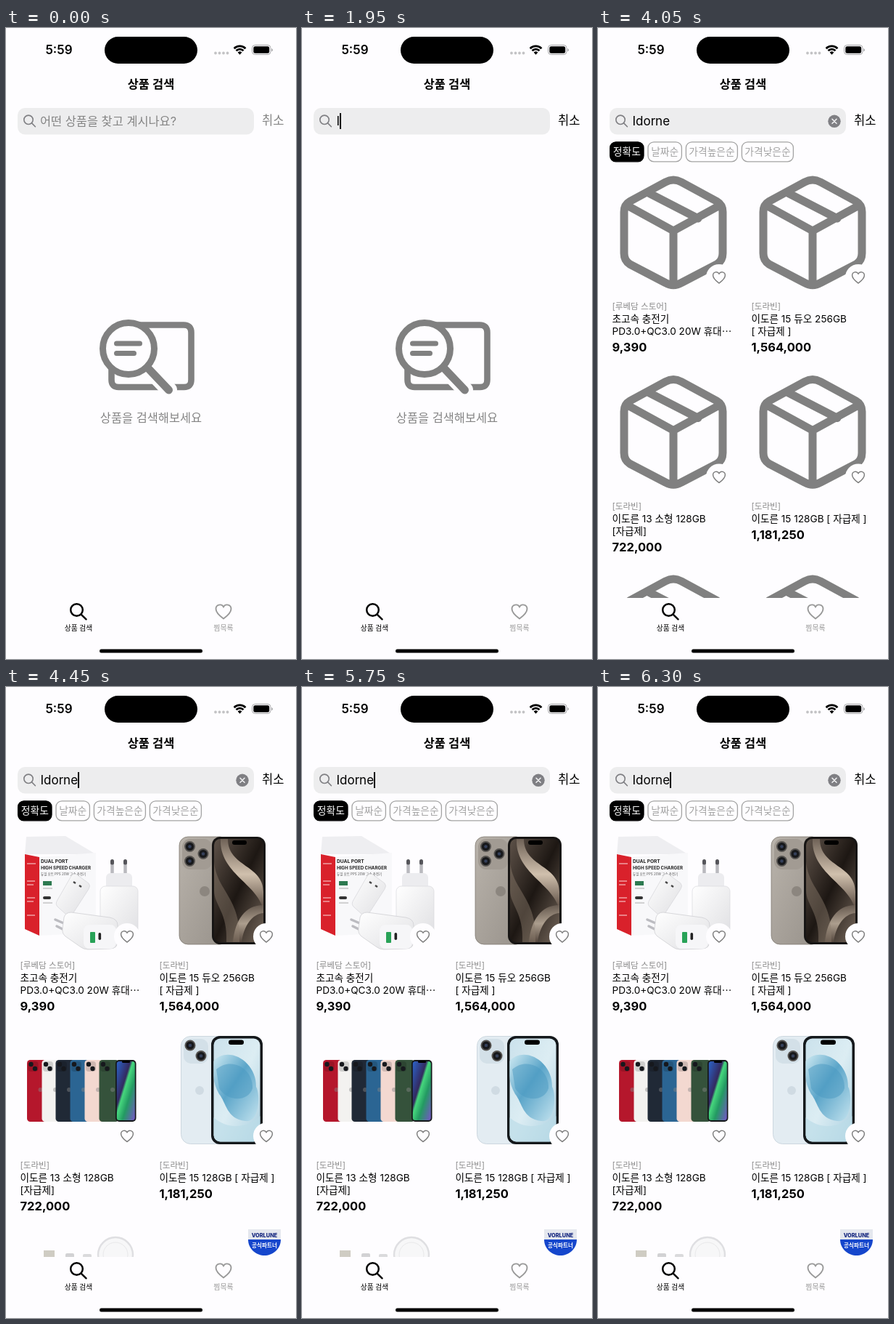
These frames come from a looping animation (400 by 868 pixels, 6500 ms). An HTML page without scripts:

```html
<!DOCTYPE html>
<html lang="ko">
<head>
<meta charset="utf-8">
<title>상품 검색</title>
<style>
html, body { margin: 0; width: 100%; height: 100%; overflow: hidden; background: #fefdff; }
body { position: relative; font-family: Inter, "Noto Sans CJK KR", "Noto Sans CJK", sans-serif; }
svg { position: absolute; left: 0; top: 0; display: block; }
text { font-size: 13.6px; }
.mid { text-anchor: middle; }
.body { font-size: 16.4px; }
.grey { fill: #858585; }
.line { fill: none; stroke-linecap: round; stroke-linejoin: round; }
.chip rect { fill: none; stroke: #a3a3a3; stroke-width: 1.3; }
.chip text { font-size: 13.8px; fill: #a3a3a3; text-anchor: middle; }
.chip .on { fill: #000; stroke: #000; }
.chip .on + text { fill: #fff; }
.shop { font-size: 11.6px; fill: #8c8c8c; }
.price { font-size: 16.5px; font-weight: 700; }
.pack { font-weight: 700; font-size: 6.2px; fill: #222; }

.cancel, .hint, .clear, .empty, .list, .boxes, .photos, .query * { animation: 6.5s step-end infinite; }
.cancel { font-size: 16.6px; animation-name: cancel; animation-timing-function: linear; }
.hint { animation-name: hint; }
.clear { animation-name: clear; animation-timing-function: linear; }
.empty { animation-name: empty; }
.list { animation-name: list; }
.boxes { animation-name: boxes; }
.photos { animation-name: photos; }

.query { position: absolute; left: 47.5px; top: 110px; height: 36px; display: flex; align-items: center; line-height: 36px; }
.query b { font-weight: 400; font-size: 17px; }
.query i { width: 2px; height: 22px; background: #000; animation-name: blink; animation-timing-function: linear; }
.query b:nth-child(1) { animation-name: k1; }
.query b:nth-child(2) { animation-name: k2; }
.query b:nth-child(3) { animation-name: k3; }
.query b:nth-child(4) { animation-name: k4; }
.query b:nth-child(5) { animation-name: k5; }
.query b:nth-child(6) { animation-name: k6; }

@keyframes k1 { 0% { font-size: 0 } 30%, to { font-size: 17px } }
@keyframes k2 { 0% { font-size: 0 } 32.308%, to { font-size: 17px } }
@keyframes k3 { 0% { font-size: 0 } 37.692%, to { font-size: 17px } }
@keyframes k4 { 0% { font-size: 0 } 39.231%, to { font-size: 17px } }
@keyframes k5 { 0% { font-size: 0 } 40.769%, to { font-size: 17px } }
@keyframes k6 { 0% { font-size: 0 } 42.308%, to { font-size: 17px } }
@keyframes blink {
  0%, 13.8% { opacity: 0 } 15.4%, 24.9% { opacity: 1 } 26.92%, 29.99% { opacity: 0 }
  30%, 57.8% { opacity: 1 } 60.8%, 62.9% { opacity: 0 } 65.4%, 72.5% { opacity: 1 }
  75.4%, 78.2% { opacity: 0 } 80.8%, 88.5% { opacity: 1 } 90.8%, 93.8% { opacity: 0 } 96.9%, to { opacity: 1 }
}
@keyframes cancel { 0%, 13.8% { fill: #858585 } 18%, to { fill: #000 } }
@keyframes hint { 0% { opacity: 1 } 30%, to { opacity: 0 } }
@keyframes clear { 0%, 32.2% { opacity: 0 } 35.4%, to { opacity: 1 } }
@keyframes empty { 0% { opacity: 1 } 58.46%, to { opacity: 0 } }
@keyframes list { 0% { opacity: 0 } 58.46%, to { opacity: 1 } }
@keyframes boxes { 0% { opacity: 1 } 63.08%, to { opacity: 0 } }
@keyframes photos { 0% { opacity: 0 } 63.08%, to { opacity: 1 } }
</style>
</head>
<body>
<svg width="400" height="868" viewBox="0 0 400 868">
  <defs>
    <path id="heart" d="M0 10C-4 7-10.5 2.5-10.5-3.5A5.6 5.6 0 0 1 0-6.2A5.6 5.6 0 0 1 10.5-3.5C10.5 2.5 4 7 0 10Z"/>
    <path id="box" class="line" stroke="#808080" stroke-width="11" d="M93 212Q104 206 115 212L164 238.5Q172 243 172 253V310Q172 320 164 325L115 350.5Q104 357 93 350.5L44 325Q36 320 36 310V253Q36 243 44 238.5ZM40 244L104 279L168 244M104 279V352M70 227L138 262"/>
    <g id="like">
      <circle cx="167" cy="343" r="18" fill="#fefdff"/>
      <use href="#heart" transform="translate(167 343) scale(.8)" fill="none" stroke="#7c7c7c" stroke-width="1.8"/>
    </g>
    <g id="lens">
      <circle r="7.5" fill="#55524f"/><circle r="5.6" fill="#17181b"/><circle r="2.3" fill="#35405a"/>
    </g>
    <g id="mini">
      <rect width="27" height="85" rx="4.5"/>
      <rect x="1.5" y="2" width="14" height="14" rx="4" fill="#000" opacity=".15"/>
      <circle cx="5.5" cy="6" r="3.2" fill="#16181d"/><circle cx="11" cy="12" r="3.2" fill="#16181d"/>
      <circle cx="18.5" cy="41" r="3" fill="#888" opacity=".45"/>
    </g>
    <linearGradient id="titan" x2="1" y2="1"><stop stop-color="#b9b3ab"/><stop offset="1" stop-color="#97918a"/></linearGradient>
    <linearGradient id="bronze" x2="1" y2="1"><stop stop-color="#5d5148"/><stop offset=".5" stop-color="#1d1713"/><stop offset="1" stop-color="#74665a"/></linearGradient>
    <linearGradient id="sand" x2="0" y2="1"><stop stop-color="#6f6257"/><stop offset=".5" stop-color="#d0c0ad"/><stop offset="1" stop-color="#57493f"/></linearGradient>
    <linearGradient id="sky" x2="1" y2="1"><stop stop-color="#cbe2ec"/><stop offset=".5" stop-color="#dcedf3"/><stop offset="1" stop-color="#a9cfe0"/></linearGradient>
    <linearGradient id="pool" x2="1" y2="1"><stop stop-color="#cfeaf2"/><stop offset=".45" stop-color="#5ba5c9"/><stop offset="1" stop-color="#c2e2ee"/></linearGradient>
    <linearGradient id="neon" x2="1" y2="1"><stop stop-color="#2c63c8"/><stop offset=".38" stop-color="#33295f"/><stop offset=".45" stop-color="#46d77d"/><stop offset=".65" stop-color="#239a62"/><stop offset="1" stop-color="#7754c8"/></linearGradient>
    <linearGradient id="shell" x2="1" y2="1"><stop stop-color="#fff"/><stop offset="1" stop-color="#dfdfe2"/></linearGradient>
    <clipPath id="s1"><rect x="287" y="209" width="68" height="142" rx="8.5"/></clipPath>
    <clipPath id="s2"><rect x="286.5" y="483.5" width="64" height="142" rx="9"/></clipPath>
  </defs>

  <!-- status bar -->
  <text x="73" y="36" class="mid" style="font-size:17px;font-weight:600">5:59</text>
  <rect x="136" y="12" width="128" height="37" rx="18.5"/>
  <path class="line" stroke="#c3c3c5" stroke-width="3.8" stroke-dasharray="0 5.5" d="M289 34.5H306"/>
  <path class="line" style="stroke-linecap:butt" stroke="#000" stroke-width="2.7" d="M314.6 28.3A11 11 0 0 1 330.4 28.3M317.5 31.3A7 7 0 0 1 327.5 31.3"/>
  <path d="M322.5 36.8L319.6 33.6A4.2 4.2 0 0 1 325.4 33.6Z"/>
  <rect x="339.5" y="23.5" width="25.5" height="13" rx="4" fill="none" stroke="#a5a5a8"/>
  <rect x="341.3" y="25.3" width="21.9" height="9.4" rx="2.5"/>
  <path d="M366.3 28V32.4Q368 31.6 368 30.2Q368 28.7 366.3 28Z" fill="#a5a5a8"/>
  <text x="200" y="83" class="mid body" font-weight="600">상품 검색</text>

  <!-- search field -->
  <rect x="16" y="110" width="326" height="36.5" rx="10" fill="#ededee"/>
  <g class="line" stroke="#7f7f83" stroke-width="1.6"><circle cx="31" cy="126.3" r="6.2"/><path d="M35.6 130.9L40.4 135.7"/></g>
  <text x="47" y="134" class="body grey hint">어떤 상품을 찾고 계시나요?</text>
  <text x="353" y="133" class="cancel">취소</text>
  <g class="clear"><circle cx="326" cy="128.3" r="8.7" fill="#7f7f83"/><path class="line" stroke="#f0f0f1" stroke-width="1.6" d="M323 125.3L329 131.3M329 125.3L323 131.3"/></g>

  <g class="empty">
    <g class="line" stroke="#808080" stroke-width="8.6">
      <path d="M180 408.5H245Q255.5 408.5 255.5 419V484Q255.5 494 245.5 494H155.5Q145.5 494 145.5 484V460"/>
      <path stroke="#fefdff" stroke-width="22" d="M198 470L225 498"/>
      <path stroke-width="11" d="M195 467L224.5 498"/>
      <circle cx="169" cy="441" r="35.5" fill="#fefdff" stroke-width="9"/>
      <path stroke-width="7" d="M152.5 434H184.5M152.5 447.5H176.5"/>
    </g>
    <text x="200" y="542" class="mid body grey">상품을 검색해보세요</text>
  </g>

  <g class="list">
    <g class="chip">
      <rect class="on" x="16.6" y="156.8" width="46.4" height="27" rx="8"/><text x="39.8" y="175">정확도</text>
      <rect x="69" y="156.8" width="46.4" height="27" rx="8"/><text x="92.2" y="175">날짜순</text>
      <rect x="121.4" y="156.8" width="71" height="27" rx="8"/><text x="157" y="175">가격높은순</text>
      <rect x="198.4" y="156.8" width="71" height="27" rx="8"/><text x="234" y="175">가격낮은순</text>
    </g>

    <g class="boxes">
      <use href="#box"/><use href="#box" x="192"/>
      <use href="#box" y="274.5"/><use href="#box" x="192" y="274.5"/>
      <use href="#box" y="549"/><use href="#box" x="192" y="549"/>
    </g>

    <g class="photos">
      <!-- charger -->
      <path d="M28 206L82 205L124 230H26Z" fill="#eeeef1"/>
      <path d="M26 230L46 234V342L26 333Z" fill="#d9212b"/>
      <path d="M46 234L124 228V338L46 342Z" fill="#f8f8fa"/>
      <path d="M29 243H41M29 267H40M29 272H38M29 290H40M29 295H38M29 314H40" stroke="#f0a0a4" stroke-width="1.4"/>
      <text x="48" y="242" class="pack" style="font-size:6.6px">DUAL PORT</text>
      <text x="48" y="250.5" class="pack">HIGH SPEED CHARGER</text>
      <text x="48" y="258.5" style="font-size:4.5px" fill="#555">듀얼 포트 PPS 20W 고속 충전기</text>
      <rect x="51" y="267" width="12" height="6" fill="#2d7a50"/>
      <rect x="51" y="288" width="11" height="4" rx="2" fill="#333"/>
      <path d="M51 277H64M51 297H64" stroke="#aaa"/>
      <path d="M90 260Q94 255 99 259L114 270Q117 273 114 278L92 312Q88 317 83 313L72 303Q67 299 71 293Z" fill="url(#shell)" stroke="#d5d5d9" stroke-width=".7"/>
      <path d="M93 268L96 270M101 273L104 275" stroke="#444" stroke-width="2.4"/>
      <path d="M146.5 257V242M164.5 257V242" class="line" stroke="#b9b9be" stroke-width="4.5"/>
      <path d="M146.5 242V239.5M164.5 242V239.5" class="line" stroke="#55555a" stroke-width="5"/>
      <rect x="138" y="256" width="36" height="30" rx="6" fill="#ececef"/>
      <rect x="130" y="274" width="52" height="72" rx="7" fill="url(#shell)" stroke="#d9d9dd" stroke-width=".7"/>
      <path d="M68 320L82 326M70 329L82 335" class="line" stroke="#bcbcc1" stroke-width="3.5"/>
      <path d="M80 317Q82 310 90 310L143 317Q154 319 154 328V350Q154 360 143 360L113 361Q107 361 102 357L82 343Q77 339 78 332Z" fill="url(#shell)" stroke="#d0d0d4" stroke-width=".8"/>
      <rect x="107" y="327" width="45" height="33" rx="8" fill="#f6f6f8"/>
      <rect x="116" y="337" width="7" height="15" rx="1" fill="#28a257"/>
      <rect x="127.5" y="338" width="3.6" height="10" rx="1.8" fill="#222"/>

      <!-- bronze phone -->
      <rect x="239" y="206" width="68" height="148" rx="12" fill="url(#titan)" stroke="#817a73" stroke-width=".8"/>
      <rect x="243" y="209" width="41" height="42" rx="11" fill="#a29b93"/>
      <use href="#lens" x="253.5" y="219.5"/><use href="#lens" x="253.5" y="239.5"/><use href="#lens" x="272" y="229.5"/>
      <circle cx="274" cy="281" r="7" fill="#8c867f"/>
      <rect x="284" y="206" width="74" height="148" rx="11.5" fill="#171514"/>
      <g clip-path="url(#s1)">
        <rect x="287" y="209" width="68" height="142" fill="url(#bronze)"/>
        <path d="M306 209C306 248 355 244 355 282V306C346 270 294 256 296 209Z" fill="url(#sand)"/>
        <path d="M355 300C330 300 316 320 313 351H325C328 328 340 312 355 311Z" fill="url(#sand)" opacity=".75"/>
        <path d="M287 240C290 280 325 290 322 351H304C306 310 287 300 287 280Z" fill="#8d7c6d" opacity=".45"/>
      </g>
      <rect x="312" y="211" width="20" height="6" rx="3"/>

      <!-- colour row -->
      <use href="#mini" x="29" y="513" fill="#b5172c"/><use href="#mini" x="49.5" y="513" fill="#f3f2f0"/>
      <use href="#mini" x="68.5" y="513" fill="#202936"/><use href="#mini" x="88.5" y="513" fill="#2b6593"/>
      <use href="#mini" x="108.5" y="513" fill="#f3d8d0"/><use href="#mini" x="128.5" y="513" fill="#35523b"/>
      <rect x="151" y="513" width="28.5" height="85" rx="5" fill="#15181a"/>
      <rect x="152.8" y="515" width="25" height="81" rx="3.5" fill="url(#neon)"/>
      <rect x="160" y="514" width="11" height="3" rx="1.5"/>

      <!-- pale phone -->
      <rect x="241.5" y="480.5" width="66" height="148" rx="13" fill="#e3ecf2" stroke="#c4d0d8" stroke-width=".8"/>
      <rect x="245" y="484" width="34" height="34" rx="10" fill="#d3e0e8"/>
      <use href="#lens" x="254" y="493"/><use href="#lens" x="269" y="507.5"/>
      <circle cx="267" cy="555" r="6" fill="#d0dbe3"/>
      <rect x="283" y="480" width="71" height="149" rx="12" fill="#15191c"/>
      <g clip-path="url(#s2)">
        <rect x="286" y="483" width="66" height="144" fill="url(#sky)"/>
        <path d="M286 515C306 492 346 515 345 550C351 560 350 600 330 597C304 594 304 572 294 560Q287 548 286 535Z" fill="url(#pool)"/>
        <path d="M290 526C310 508 341 524 340 552C334 572 304 570 294 552Z" fill="#4b9ac2" opacity=".5"/>
        <path d="M286 592C310 612 335 604 351 590V626H286Z" fill="#bcdde9" opacity=".7"/>
      </g>
      <rect x="307" y="485.5" width="21" height="6.5" rx="3.2"/>

      <!-- cables and badge -->
      <circle cx="151" cy="781" r="24" fill="#f7f7f8" stroke="#dfdfe2" stroke-width="2.5"/>
      <circle cx="151" cy="781" r="17" fill="none" stroke="#e8e8ea"/>
      <rect x="52" y="775" width="15" height="12" fill="#cfccc3"/>
      <rect x="82" y="779" width="12" height="8" rx="2" fill="#d2d2d4"/>
      <rect x="106" y="780" width="12" height="8" rx="2" fill="#dadadc"/>
      <path d="M334 746H379V760H334Z" fill="#e4e7ee"/>
      <path d="M334 760H379C379 774 367 782 356.500 782S334 774 334 760Z" fill="#1546cc"/>
      <text x="356.500" y="756.500" class="mid" style="font-size:7.4px;font-weight:800" fill="#15267e">VORLUNE</text>
      <text x="356.500" y="770.500" class="mid" style="font-size:7.6px;font-weight:700" fill="#fff">공식파트너</text>
    </g>

    <use href="#like"/><use href="#like" x="192"/>
    <use href="#like" y="274.5"/><use href="#like" x="192" y="274.5"/>

    <g>
      <text x="19.500" y="387" class="shop">[루베담 스토어]</text>
      <text x="19.500" y="405">초고속 충전기</text>
      <text x="19.500" y="422">PD3.0+QC3.0 20W 휴대⋯</text>
      <text x="19.500" y="445" class="price">9,390</text>
    </g>
    <g transform="translate(192 0)">
      <text x="19.500" y="387" class="shop">[도라빈]</text>
      <text x="19.500" y="405">이도른 15 듀오 256GB</text>
      <text x="19.500" y="422">[ 자급제 ]</text>
      <text x="19.500" y="445" class="price">1,564,000</text>
    </g>
    <g transform="translate(0 274.5)">
      <text x="19.500" y="387" class="shop">[도라빈]</text>
      <text x="19.500" y="405">이도른 13 소형 128GB</text>
      <text x="19.500" y="422">[자급제]</text>
      <text x="19.500" y="445" class="price">722,000</text>
    </g>
    <g transform="translate(192 274.5)">
      <text x="19.500" y="387" class="shop">[도라빈]</text>
      <text x="19.500" y="405">이도른 15 128GB [ 자급제 ]</text>
      <text x="19.500" y="428" class="price">1,181,250</text>
    </g>
  </g>

  <!-- tab bar -->
  <rect y="784" width="400" height="84" fill="#fefdff"/>
  <g class="line" stroke="#000" stroke-width="2.5"><circle cx="97.500" cy="800.500" r="8.300"/><path d="M103.800 806.800L110.500 813.300"/></g>
  <text x="100" y="829" class="mid" style="font-size:9.8px;font-weight:500">상품 검색</text>
  <use href="#heart" transform="translate(300 802.5)" fill="none" stroke="#999" stroke-width="1.9"/>
  <text x="300" y="829" class="mid" style="font-size:9.9px" fill="#999">찜목록</text>
  <rect x="129" y="854.500" width="142" height="5" rx="2.500"/>
</svg>
<div class="query"><b>I</b><b>d</b><b>o</b><b>r</b><b>n</b><b>e</b><i></i></div>
</body>
</html>
```
